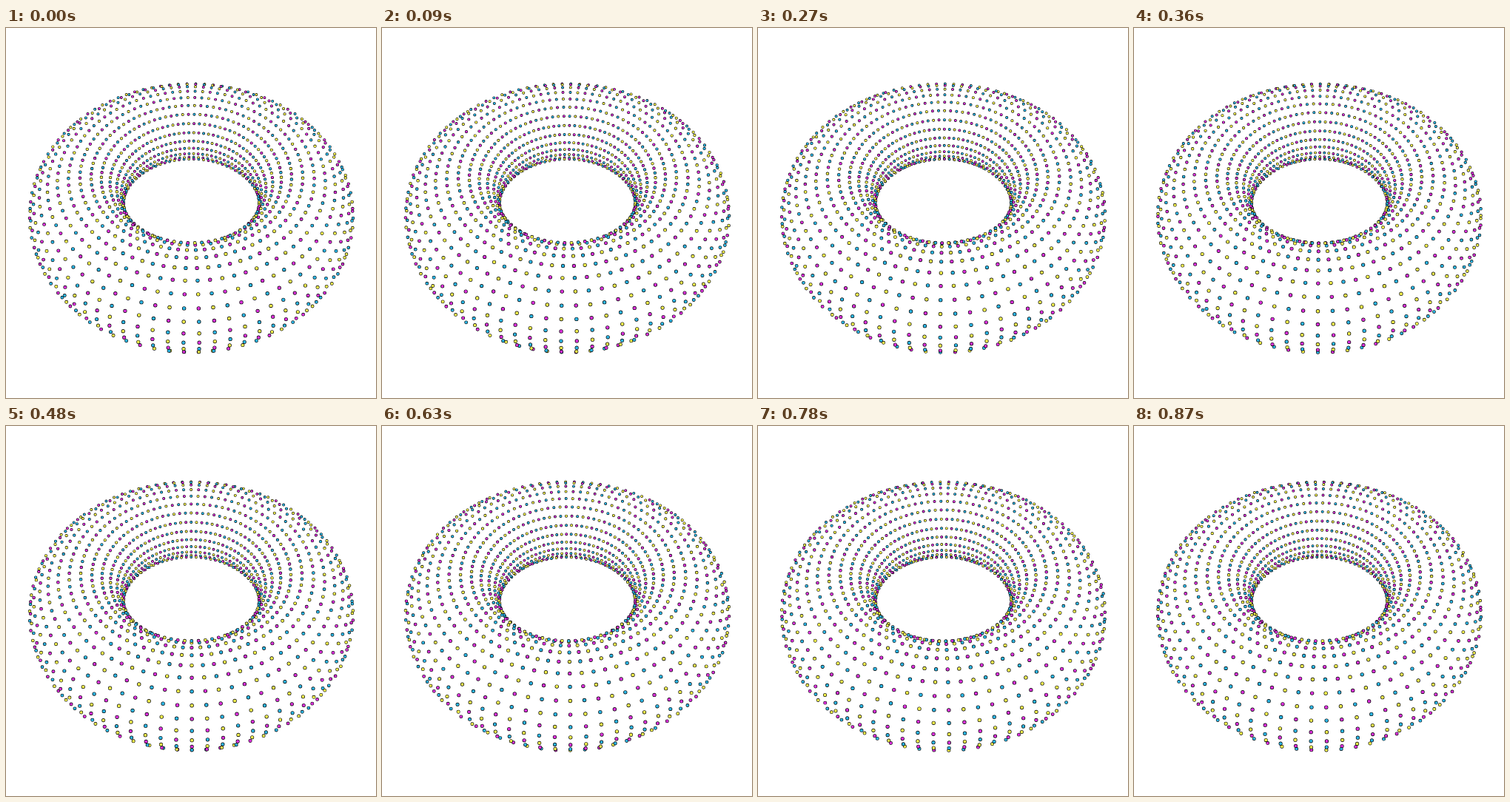
Write an HTML page with a canvas that moves like this. It is 500x500 px and loops after 900 ms.

```html
<!DOCTYPE html>
<html>
<head>
<meta charset="utf-8">
<style>
  html, body { margin: 0; height: 100%; overflow: hidden; background: #fff; }
  canvas { display: block; }
</style>
</head>
<body>
<canvas id="stage" width="500" height="500"></canvas>
<script>
const ctx = document.getElementById('stage').getContext('2d');
const { sin, cos, hypot, PI } = Math;

const LOOP = 900, STEP = 30;
const COLS = 84, ROWS = 28;
const RING = 2.567;              // ring radius, with a tube radius of 1
const BEAD = 0.0245;
const HORIZON = -0.12;           // beads just past the edge still peek out
const TILT = 52.2 * PI / 180;
const FOCAL = 500, DEPTH = 8.572, LIFT = 0.465;
const PHASE = 1.9 * PI / 180;
const COLORS = ['#f4f24e', '#2bb5e4', '#dc30dc'];

// Viewpoint in torus coordinates: toward the viewer, and up the axis
const EYE_FRONT = cos(TILT) * DEPTH + sin(TILT) * LIFT;
const EYE_UP = sin(TILT) * DEPTH - cos(TILT) * LIFT;

function drawBead(u, v, color) {
  const radius = RING + cos(v);
  const x = radius * sin(u), front = radius * cos(u), up = sin(v);

  const toFront = EYE_FRONT - front, toUp = EYE_UP - up;
  const facing = cos(v) * (cos(u) * toFront - sin(u) * x) + sin(v) * toUp;
  if (facing < HORIZON * hypot(x, toFront, toUp)) return;

  const z = DEPTH - cos(TILT) * front - sin(TILT) * up;
  const y = LIFT - sin(TILT) * front + cos(TILT) * up;
  const scale = FOCAL / z;
  ctx.beginPath();
  ctx.arc(250.5 + x * scale, 250.4 - y * scale, BEAD * scale, 0, 2 * PI);
  ctx.stroke();
  ctx.fillStyle = color;
  ctx.fill();
}

function draw(t) {
  ctx.clearRect(0, 0, 500, 500);
  ctx.lineWidth = 1.3;
  ctx.strokeStyle = '#000';
  for (let i = 0; i < COLS; i++) {
    const u = (i - 0.5 + t) * 2 * PI / COLS;
    // Rows start on the underside, where the color seam stays hidden
    for (let j = -7; j < ROWS - 7; j++) {
      const v = (j + 2 * t) * 2 * PI / ROWS + PHASE;
      drawBead(u, v, COLORS[(i + j + 9) % 3]);
    }
  }
}

const start = performance.now();
let shown = -1;
function tick() {
  const step = Math.floor((performance.now() - start) % LOOP / STEP);
  if (step !== shown) draw((shown = step) * STEP / LOOP);
  requestAnimationFrame(tick);
}
tick();
</script>
</body>
</html>
```
